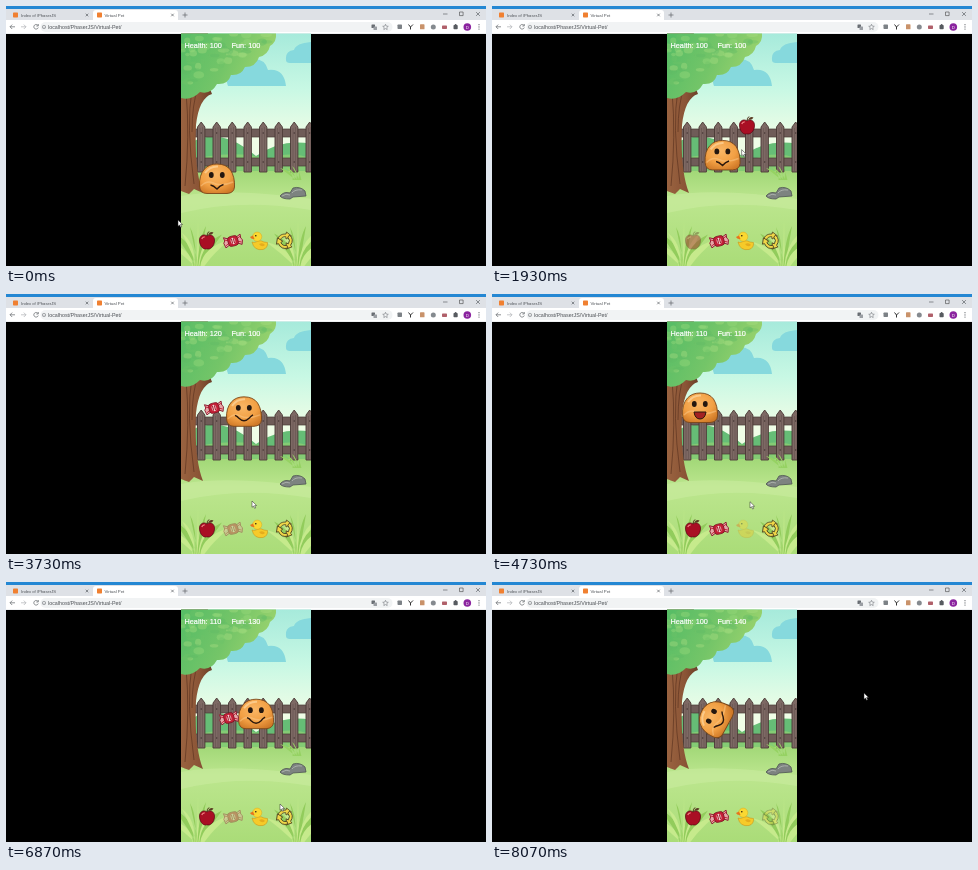
Animation of 480x260 px, one loop 8.14 s. Source, as an HTML page:

```html
<!DOCTYPE html>
<html lang="en">
<head>
<meta charset="utf-8">
<title>Virtual Pet</title>
<style>
html, body { margin: 0; width: 100%; height: 100%; overflow: hidden; background: #000; }
svg { display: block; width: 480px; height: 260px; }
text { font-family: "Liberation Sans", Arial, sans-serif; }
</style>
</head>
<body>
<svg viewBox="0 0 480 260" xmlns="http://www.w3.org/2000/svg">
<defs>
  <linearGradient id="sky" x1="0" y1="0" x2="0" y2="1">
    <stop offset="0" stop-color="#a6eadb"/><stop offset=".4" stop-color="#c8f8e4"/><stop offset=".75" stop-color="#effde6"/>
  </linearGradient>
  <linearGradient id="lawn" x1="0" y1="0" x2="0" y2="1">
    <stop offset="0" stop-color="#a2d878"/><stop offset=".3" stop-color="#bce68e"/><stop offset="1" stop-color="#aadc78"/>
  </linearGradient>
  <linearGradient id="bark">
    <stop offset="0" stop-color="#9a6340"/><stop offset=".6" stop-color="#8a5436"/><stop offset="1" stop-color="#6b3f28"/>
  </linearGradient>
  <linearGradient id="crown" x1="0" y1=".2" x2="1" y2=".5">
    <stop offset="0" stop-color="#58bd66"/><stop offset=".5" stop-color="#74c568"/><stop offset="1" stop-color="#a0d56e"/>
  </linearGradient>
  <radialGradient id="skin" cx=".45" cy=".35" r=".7">
    <stop offset="0" stop-color="#f9b665"/><stop offset=".6" stop-color="#f2a044"/><stop offset="1" stop-color="#d07a28"/>
  </radialGradient>
  <clipPath id="view"><path d="M175 27.500h130V260H175z"/></clipPath>

  <g id="apple">
    <path d="M0-5C-3-7.500-8-5.500-7.500 0C-7 6-3 9-.3 7.800C3 9 7.200 5.500 7.500 0C8-5.500 3-7.500 0-5z" fill="#a90f24" stroke="#570713" stroke-width=".7"/>
    <path d="M-5.300-2q1-2.300 3-2.200" fill="none" stroke="#f07c82" stroke-width="1.200"/>
    <path d="M0-5Q0-8 2-9.500" fill="none" stroke="#4a2a16" stroke-width="1"/>
    <path d="M1-6.500Q3.500-10 6.500-8.500Q5-5.500 1-6.500z" fill="#5a3a22"/>
  </g>
  <g id="candy">
    <g transform="rotate(-14)">
      <path d="M-4-3L-8.500-5.500L-8-2L-9.500 0L-8.500 5L-4 3zM4-3L8.500-5L8.200-1L9.500 1L8 5.500L4 3z" fill="#e6a6a8" stroke="#8c1f32" stroke-width=".9"/>
      <path d="M-8-3l4 2M-8 3l4-2M8-3l-4 2M8 3l-4-2" stroke="#c8283c" stroke-width=".9"/>
      <rect x="-5" y="-5" width="10" height="10" rx="3" fill="#c41f37" stroke="#74101f" stroke-width=".7"/>
      <ellipse rx="2.300" ry="3.200" fill="#f1d2d0"/>
      <path d="M-1-2.500v5M1-2.500v5" stroke="#a3182c" stroke-width="1"/>
    </g>
  </g>
  <g id="duck">
    <path d="M-7 1C-5 2-3 1-1 0Q2-1 5 1L8.500 1.500Q9 7 4 8.500Q-5 10-7 1z" fill="#f6ca29" stroke="#c58b14" stroke-width=".5"/>
    <circle cx="-1.800" cy="-4.300" r="4.600" fill="#fad832" stroke="#d39c19" stroke-width=".4"/>
    <path d="M-6-5.500L-9-4Q-8-1.500-4.500-2z" fill="#e8721c"/>
    <circle cx="-3.200" cy="-5.200" r=".8" fill="#231a0c"/>
    <path d="M0 3Q4 1 6 4Q3 7 0 3z" fill="#e5ac1c"/>
  </g>
  <g id="spin" fill="#f0d648" stroke="#4a4220" stroke-width=".8">
    <path id="bend" d="M-7.500-1Q-6-7.500 1-7L1.500-9L6.500-5L1-2L.8-4.300Q-3.500-4.800-4.700-.5z"/>
    <use href="#bend" transform="rotate(120)"/>
    <use href="#bend" transform="rotate(240)"/>
  </g>
</defs>

<g id="browser"></g>
<g clip-path="url(#view)">
  <path d="M175 27h130v140H175z" fill="url(#sky)"/>
  <path d="M222 80Q218 70 229 68Q231 55 246 53Q259 52 262 64Q278 62 280 80z" fill="#86d9dd"/>
  <path d="M280 54Q279 45 288 44Q290 37 306 36V57H284Q280 57 280 54z" fill="#86d9dd"/>
  <path d="M175 146Q190 128 214 131Q232 134 250 150Q276 132 306 138V170H175z" fill="#66bd76"/>
  <path d="M175 156Q225 142 262 153Q285 144 306 153V170H175z" fill="#84cb74"/>
  <path d="M175 165h130v95H175z" fill="url(#lawn)"/>
  <path d="M175 190Q220 181 305 193V204Q235 192 175 207z" fill="#cdeea4" opacity=".5"/>
  <g id="fence"></g>
  <path d="M175 27H202Q196 66 206 88Q193 92 190 119Q188 164 197 187L188 183L183 188L175 185z" fill="url(#bark)"/>
  <path d="M180 85Q184 130 179 180M186 83Q180 119 188 178M192 82Q186 98 186 126" fill="none" stroke="#5e3622" stroke-width="1" opacity=".7"/>
  <g id="leaves"></g>
  <g id="grass"></g>
  <path d="M274 190Q278 185 284 187L287 182Q294 180 299 185L300 190L287 191L284 193Q276 193 274 190z" fill="#7d8380" stroke="#4e5553" stroke-width=".8"/>
  <path d="M286 187Q289 183 296 184M276 190Q280 187 284 189" fill="none" stroke="#a9afaa" stroke-width="1"/>
  <g id="tray"></g>
  <g fill="#fff" stroke="#fff" stroke-width=".22" font-size="7.300">
    <text id="health" x="178.500" y="41.800"></text>
    <text id="fun" x="225.500" y="41.800"></text>
  </g>
  <g id="pet">
    <path d="M-17.500 7Q-18-4-12.500-10Q-8-15 0-15Q9-15 13.500-9Q18-2 17.500 8Q17 14 10 14.500H-10Q-17 14.500-17.500 7z" fill="url(#skin)" stroke="#7b4719" stroke-width=".9"/>
    <path d="M-12-6Q-7-13 1-12.500" fill="none" stroke="#ffe0ae" stroke-width="2" opacity=".6"/>
    <path d="M-16 7Q-10 1-4 4Q4 8 16 3" fill="none" stroke="#fbc98a" stroke-width="1.500" opacity=".5"/>
    <ellipse cx="-5.700" cy="-4" rx="2.400" ry="2.900" fill="#24170f"/>
    <ellipse cx="5.300" cy="-4" rx="2.400" ry="2.900" fill="#24170f"/>
    <g class="face"><path d="M-6.500 6Q-3.500 6.500 0 10Q3 6.500 6.500 5.500" fill="none" stroke="#2b180d" stroke-width="1.400"/></g>
    <g class="face"><path d="M-9 3.500Q-6.500 4.500-5 6.500Q0 11.500 5 6.500Q6.500 4.500 9 3" fill="none" stroke="#2b180d" stroke-width="1.400"/></g>
    <g class="face"><path d="M-6 4H6Q5 11 0 11Q-5 11-6 4z" fill="#a32222" stroke="#2b180d"/></g>
    <g class="face"><ellipse cy="7" rx="4" ry="5.300" fill="#6d161c" stroke="#35160f"/><ellipse cy="9" rx="2.900" ry="3" fill="#f0708a"/></g>
  </g>
  <use id="placed"/>
</g>
<path id="cursor" d="M0 0V6.300L1.500 5L2.600 7.300L3.700 6.800L2.600 4.600L4.600 4.500z" fill="#fff" stroke="#222" stroke-width=".5"/>
</svg>
<script>
const LOOP = 8140;
const $ = id => document.getElementById(id);

function add(parent, tag, attrs, label) {
  const el = document.createElementNS('http://www.w3.org/2000/svg', tag);
  for (const key in attrs) el.setAttribute(key, attrs[key]);
  if (label) el.textContent = label;
  return parent.appendChild(el);
}
let seed = 17;
const rand = () => (seed = seed * 16807 % 2147483647) / 2147483647;

function drawBrowser(g) {
  const box = (x, y, width, height, fill, rx = 0) => add(g, 'rect', { x, y, width, height, fill, rx });
  const line = (d, stroke = '#5f6368', width = .7) => add(g, 'path', { d, stroke, 'stroke-width': width, fill: 'none' });
  const dot = (cx, cy, r, fill) => add(g, 'circle', { cx, cy, r, fill });
  const label = (x, y, size, str, fill = '#4b4f54') => add(g, 'text', { x, y, 'font-size': size, fill }, str);
  const cross = (x, y, r) => line(`M${x - r} ${y - r}l${2 * r} ${2 * r}m0 ${-2 * r}l${-2 * r} ${2 * r}`);

  box(0, 0, 480, 28, '#dee1e6');
  box(0, 0, 480, 3, '#2487d3');
  box(87, 4, 85, 14, '#fff', 3);
  box(0, 14, 480, 13.5, '#fff');
  for (const x of [7, 91]) box(x, 6.500, 5, 5, '#f08031', .7);
  label(15, 10.600, 4.150, 'Index of /PhaserJS');
  label(98.500, 10.600, 4.300, 'Virtual Pet');
  cross(81, 9, 1.300);
  cross(166.500, 9, 1.300);
  line('M176.500 9h5M179 6.500v5');
  line('M437 8h4.500');
  line('M453.500 6h3.600v3.600h-3.600z', '#444', .6);
  cross(472, 8, 1.900);

  line('M9 20.800H4M6.200 18.600L4 20.800L6.200 23');
  line('M15 20.800h5M17.800 18.600L20 20.800L17.800 23', '#aeb1b5');
  line('M32 19.500A2.300 2.300 0 1 0 32.300 21.500M32.300 18v2h-2');
  box(34.500, 16, 352, 10, '#f1f3f4', 5);
  add(g, 'circle', { cx: 38, cy: 21, r: 1.700, fill: 'none', stroke: '#5f6368', 'stroke-width': .5 });
  line('M38 20.700v1.200', '#5f6368', .5);
  label(42, 22.800, 5.350, 'localhost/PhaserJS/Virtual-Pet/');
  box(365.500, 18.500, 3.500, 3.500, '#686d72', .5);
  box(367.500, 20.500, 3.500, 3.500, '#9a9ea3', .5);
  line('M379.500 18.300l.8 1.800 2 .2-1.500 1.300.4 2-1.700-1-1.700 1 .4-2-1.500-1.300 2-.2z', '#5f6368', .5);
  box(391.500, 18.500, 4.500, 4.500, '#7c8186', .7);
  line('M402.500 18.500l2 2.500v2.500M407 18.500l-2.500 2.500', '#333', 1);
  box(414, 18.300, 4.500, 5, '#c9926a', .6);
  dot(427.300, 21, 2.500, '#858a8f');
  box(436, 19.500, 5, 3.500, '#b0606a', .7);
  box(447.500, 19, 4.200, 4.200, '#575b60', .8);
  dot(449.600, 18.900, 1, '#575b60');
  dot(461.300, 21, 3.800, '#8b249f');
  label(459.800, 22.600, 4.300, 'D', '#fff');
  for (const y of [18.700, 20.900, 23.100]) dot(473, y, .6, '#5f6368');
}

function drawFence(g) {
  for (const y of [123, 152]) add(g, 'rect', { x: 189, y, width: 117, height: 8, fill: '#6f5c58', stroke: '#493936', 'stroke-width': .7 });
  for (let i = 0; i < 8; i++) {
    const x = 191.500 + i * 15.500;
    add(g, 'path', { d: `M${x} 166V121L${x + 3.700} 116L${x + 7.400} 121V166z`, fill: '#7d6964', stroke: '#4a3936', 'stroke-width': .9 });
    add(g, 'path', { d: `M${x + 2.500} 122v43M${x + 5} 121v44`, stroke: '#655350', 'stroke-width': .6 });
    for (const y of [127, 156]) add(g, 'circle', { cx: x + 3.700, cy: y, r: .7, fill: '#3d2f2d' });
  }
}

function drawLeaves(g) {
  add(g, 'path', {
    d: 'M175 27H270Q271 36 264 40Q262 49 253 51Q250 61 239 61Q235 70 225 69Q222 79 211 78Q205 89 194 86Q185 95 175 92z',
    fill: 'url(#crown)'
  });
  const tones = ['#98d97c', '#5fb964', '#a8dd80', '#6cc067'];
  for (let i = 0; i < 60; i++) {
    const u = rand(), x = 175 + u * 86, y = 28 + rand() * (55 - u * 46);
    add(g, 'ellipse', { cx: x, cy: y, rx: 2 + rand() * 4, ry: 1.500 + rand() * 2.500, fill: tones[i % 4], opacity: .4 });
  }
}

function drawGrass(g) {
  const blade = (x, y, dx, h, w, fill) => add(g, 'path', {
    d: `M${x - w} ${y}Q${x} ${y - h * .7} ${x + dx} ${y - h}Q${x + dx * .4} ${y - h * .5} ${x + w} ${y}z`, fill
  });
  for (let i = 0; i < 9; i++) {
    const lean = -28 + i * 7, h = 50 - Math.abs(lean) * .6 - rand() * 8, fill = i % 2 ? '#92cc5c' : '#c6ea8c';
    blade(188 + i, 261, lean, h, 1.700, fill);
    blade(288 + i, 261, lean, h, 1.700, fill);
  }
  for (let i = 0; i < 4; i++) blade(288 + i * 2, 174, -14 + i * 4, 12 + i, 1.500, '#96d263');
}

drawBrowser($('browser'));
drawFence($('fence'));
drawLeaves($('leaves'));
drawGrass($('grass'));

const names = ['apple', 'candy', 'duck', 'spin'];
const icons = names.map((name, i) =>
  add($('tray'), 'use', { href: '#' + name, transform: `translate(${201 + i * 26} 235)` }));
const faces = [...document.querySelectorAll('.face')];

const MOVE = 700, CHEW = 1000 / 7, SPIN_AT = 7656, SPIN_SPEED = .72;
const chewing = [1, 2, 3, 2, 1];
const meals = [
  { item: 0, pick: 560, drop: 1620, x: 255, y: 120, health: 20, fun: 0 },
  { item: 1, pick: 2760, drop: 3478, x: 208, y: 114, health: -10, fun: 10 },
  { item: 2, pick: 4450, drop: 5005, x: 273, y: 129, health: 0, fun: 20 },
  { item: 1, pick: 6120, drop: 6550, x: 223, y: 136, health: -10, fun: 10 }
];
// time, x, y
const path = [
  [0, 172, 214], [70, 172, 214], [480, 202, 234], [620, 202, 234], [1070, 230, 143],
  [1500, 255, 119], [1680, 255, 119], [2500, 231, 229], [2820, 231, 229],
  [3380, 208, 113], [3500, 208, 113], [3730, 246, 207], [4000, 253, 234], [4620, 253, 234],
  [4960, 273, 129], [5050, 273, 129], [5600, 209, 225], [6020, 228, 234], [6160, 228, 234],
  [6500, 223, 135], [6570, 223, 135], [6870, 274, 222], [7150, 279, 233], [7680, 279, 233],
  [8040, 372, 111], [LOOP, 372, 111]
];
const mix = (a, b, k) => a + (b - a) * k;

function pointer(t) {
  const i = path.findIndex(p => p[0] > t), a = path[i - 1], b = path[i];
  const k = (t - a[0]) / (b[0] - a[0]), e = k * k * (3 - 2 * k);
  return `translate(${mix(a[1], b[1], e)} ${mix(a[2], b[2], e)})`;
}

function render(t) {
  let x = 211, y = 173, health = 100, fun = 100, face = 0, chosen = -1, onStage = null;
  for (const m of meals) {
    if (t >= m.pick) chosen = m.item;
    if (t < m.drop) break;
    const k = Math.min(1, (t - m.drop) / MOVE);
    x = mix(x, m.x, k);
    y = mix(y, m.y, k);
    if (k < 1) {
      onStage = m;
    } else {
      face = chewing[Math.floor((t - m.drop - MOVE) / CHEW)] || 1;
      health += m.health;
      fun += m.fun;
    }
  }
  const spinning = t >= SPIN_AT;
  if (spinning) chosen = 3;
  const angle = spinning ? (t - SPIN_AT) * SPIN_SPEED : 0;

  $('pet').setAttribute('transform', `translate(${x} ${y}) rotate(${angle})`);
  faces.forEach((el, i) => el.style.display = i === face ? '' : 'none');
  icons.forEach((el, i) => el.setAttribute('opacity', i === chosen ? .4 : 1));
  const placed = $('placed');
  placed.style.display = onStage ? '' : 'none';
  if (onStage) {
    placed.setAttribute('href', '#' + names[onStage.item]);
    placed.setAttribute('transform', `translate(${onStage.x} ${onStage.y})`);
  }
  $('health').textContent = 'Health: ' + health;
  $('fun').textContent = 'Fun: ' + fun;
  $('cursor').setAttribute('transform', pointer(t));
}

const start = performance.now();
function tick() {
  render((performance.now() - start) % LOOP);
  requestAnimationFrame(tick);
}
tick();
</script>
</body>
</html>
```
